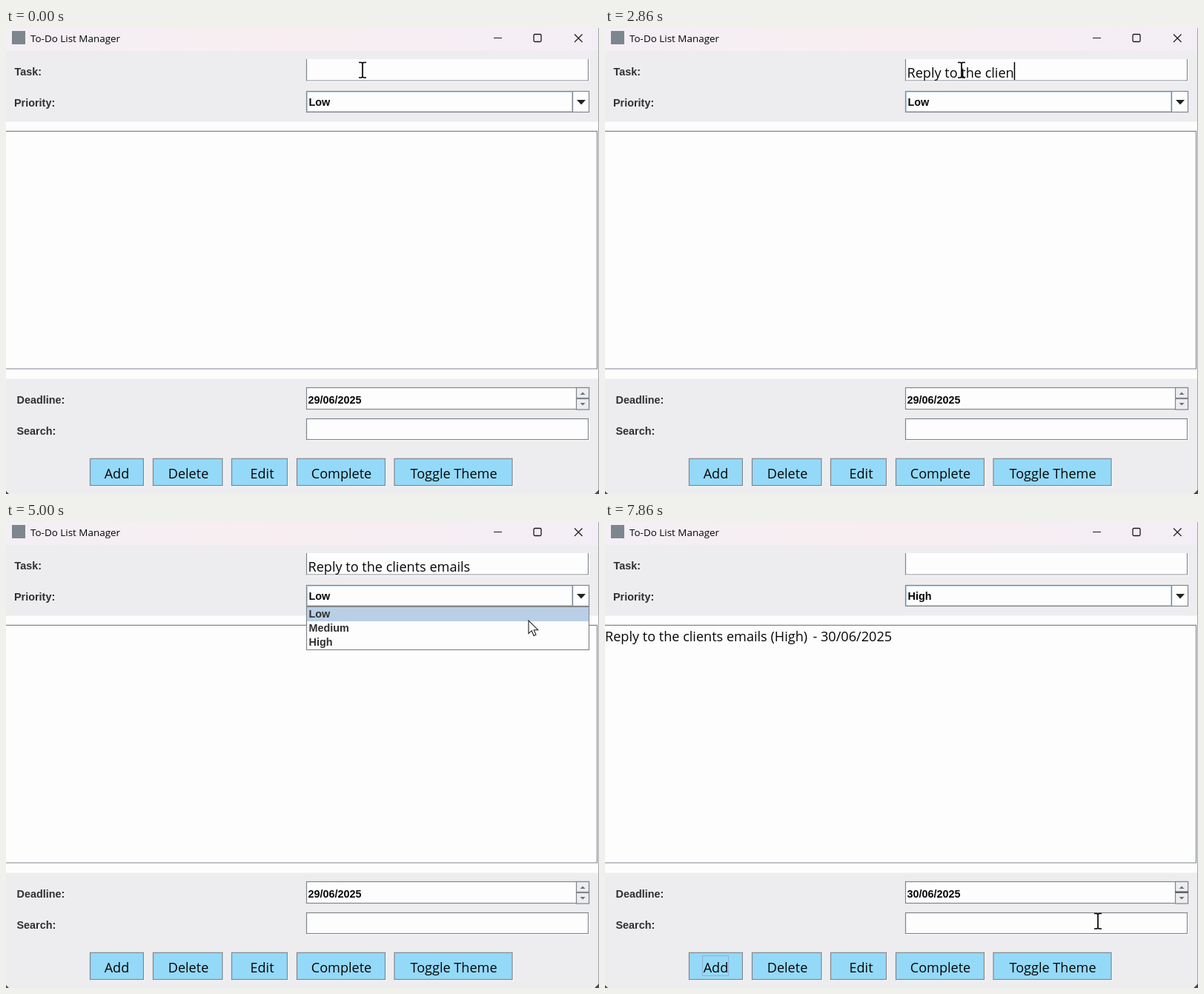
Animation of 800x629 px, one loop 8 s. Source, as an HTML page:

```html
<!DOCTYPE html>
<html lang="en">
<head>
<meta charset="utf-8">
<title>To-Do List Manager</title>
<style>
html, body { margin: 0; width: 100%; height: 100%; overflow: hidden; background: #fdfdfd; }
svg { display: block; width: 100vw; height: 100vh; }
text { white-space: pre; }
.ui { font: 18.1px "Open Sans", "Noto Sans", sans-serif; fill: #060606; }
.bold { font: bold 14.4px "Liberation Sans", Arial, sans-serif; fill: #303030; }
.dark { fill: #080808; }
.edge { fill: none; stroke: #80868d; stroke-width: 1.2; }
.lite { fill: none; stroke: #fff; }
.mid { text-anchor: middle; }
</style>
</head>
<body>
<svg id="stage" viewBox="0 0 800 629">
  <defs>
    <linearGradient id="bar">
      <stop offset="0" stop-color="#f3eff4"/>
      <stop offset=".45" stop-color="#f8eef1"/>
      <stop offset="1" stop-color="#f3eef5"/>
    </linearGradient>
  </defs>
  <rect width="800" height="629" fill="#fdfdfd"/>
  <rect width="800" height="31" fill="url(#bar)"/>
  <rect x="8" y="4" width="18" height="18" fill="#7d868f"/>
  <text x="33" y="19" class="ui" style="font-size:13.45px">To-Do List Manager</text>
  <path d="M658 13.5h11M767 8.500l10.500 10.500M777.500 8.500l-10.500 10.500" fill="none" stroke="#1a1a1a" stroke-width="1.200"/>
  <rect x="712" y="8.500" width="10" height="10" rx="1.500" fill="none" stroke="#1a1a1a" stroke-width="1.300"/>

  <rect y="31" width="799" height="95.500" fill="#ededef"/>
  <rect y="473.500" width="799" height="156" fill="#ededef"/>
  <path class="edge" d="M0 139.300H797.500V460H0"/>
  <path d="M799.500 0V629" stroke="#a2a2a6"/>
  <path d="M0 625v4h4zM800 623v6h-6z" fill="#4a4a4e"/>

  <text x="11.500" y="64" class="bold">Task:</text>
  <text x="11" y="106" class="bold">Priority:</text>
  <text x="14.500" y="507" class="bold">Deadline:</text>
  <text x="14.500" y="549" class="bold">Search:</text>

  <rect x="405" y="42" width="381" height="30" fill="#fdfdfd"/>
  <path class="edge" d="M405.500 42V71H785.500V42"/>
  <path class="lite" d="M406 72.300H786.700V42"/>
  <text id="task" x="407.500" y="66.500" class="ui"></text>
  <rect id="caret" y="46" width="1.500" height="24" fill="#000"/>

  <rect x="405.500" y="85.500" width="381" height="28" class="edge" style="fill:#fdfdfd"/>
  <rect id="combo" x="406.500" y="86.500" width="357" height="26" stroke="#b8cfe5"/>
  <path class="edge" d="M764.500 86V113"/>
  <path d="M770 97h12l-6 6.500z" fill="#222"/>
  <text id="level" x="408.500" y="105" class="bold"></text>

  <rect x="405.500" y="485.500" width="381" height="29" class="edge" style="fill:#fdfdfd"/>
  <rect id="mark" x="408" y="492" width="17" height="18" fill="#b4c6da"/>
  <text id="date" x="407.500" y="507" class="bold dark"></text>
  <rect x="769.500" y="485.500" width="17" height="14" class="edge" style="fill:#ededef"/>
  <rect x="769.500" y="500.500" width="17" height="14.500" class="edge" style="fill:#ededef"/>
  <path d="M774.500 495h7l-3.500-3.500zM774.500 506h7l-3.500 3.500z" fill="#6c737a"/>
  <path id="spun" d="M769 499.500h18" stroke="#505962" stroke-width="2"/>

  <rect x="405.500" y="527.500" width="380" height="28" class="edge" style="fill:#fdfdfd"/>
  <path class="lite" d="M406 556.700H786.700V528"/>

  <g id="buttons"></g>
  <rect id="focus" x="131.500" y="585.500" width="35" height="27" fill="none" stroke="#8fafd0"/>

  <text id="entry" class="ui" y="161"><tspan x="0">Reply to the clients emails</tspan><tspan x="223.500">(High)</tspan><tspan x="280.500">- 30/06/2025</tspan></text>

  <g id="popup">
    <rect x="405.500" y="114.500" width="381" height="58" class="edge" style="fill:#fdfdfd"/>
    <rect id="hover" x="406" width="380" height="19" fill="#b8cfe5"/>
    <text x="408.500" y="129" class="bold">Low</text>
    <text x="408.500" y="148" class="bold">Medium</text>
    <text x="408.500" y="167" class="bold">High</text>
  </g>

  <path id="beam" d="M-5-10.500H-1.500L0-9.500L1.500-10.500H5M0-9.500V9.500M-5 10H-1.500L0 9L1.500 10H5" fill="none" stroke="#000" stroke-width="1.700"/>
  <path id="arrow" d="M0 0V17.500L4.200 13.700L7 20.500L10 19.200L7.200 12.700H12.700Z" fill="#fff" stroke="#222" stroke-width="1.100"/>
</svg>
<script>
const LOOP = 8000, STEPS = 56;
const MESSAGE = 'Reply to the clients emails';
const $ = id => document.getElementById(id);
const show = (id, on) => $(id).setAttribute('visibility', on ? 'visible' : 'hidden');

// label, left, width, text centre
const BUTTONS = [
  ['Add', 113, 73, 149.5], ['Delete', 198, 94.5, 246], ['Edit', 304, 76, 345.5],
  ['Complete', 392, 120, 452.5], ['Toggle Theme', 523.5, 160, 604]
];
$('buttons').innerHTML = BUTTONS.map(([label, x, w, mid]) => `
  <path class="lite" d="M${x + 1} 618.7H${x + w + .7}V582"/>
  <rect id="${label}" x="${x + .5}" y="581.3" width="${w - 1}" height="36.2" class="edge"/>
  <text x="${mid}" y="608" class="ui mid">${label}</text>`).join('');
for (const [label] of BUTTONS) $(label).style.fill = '#94d9f8';

// step, x, y
const PATH = [
  [29, 481, 57], [32, 785, 87], [33, 776, 99], [34, 770, 103], [36, 640, 163], [37, 610, 164],
  [39, 491, 545], [41, 777, 493], [43, 777, 493], [46, 400, 548], [48, 158, 602],
  [51, 158, 602], [54, 640, 542], [55, 665, 539]
];

function pointer(k) {
  const i = PATH.findIndex(p => p[0] >= k);
  if (i === 0) return PATH[0].slice(1);
  const [k0, x0, y0] = PATH[i - 1], [k1, x1, y1] = PATH[i];
  const u = (k - k0) / (k1 - k0);
  return [x0 + (x1 - x0) * u, y0 + (y1 - y0) * u];
}

const within = (v, a, b) => v >= a && v <= b;

function overText(x, y) {
  return within(x, 405, 786) && (within(y, 42, 72) || within(y, 527, 556)) ||
    within(x, 405, 768) && within(y, 485, 515);
}

function draw(t) {
  const k = Math.min(STEPS - 1, Math.floor(t / LOOP * STEPS + .05));
  const time = k * LOOP / STEPS;
  const typed = Math.max(0, Math.floor((time - 400) / 129 - 1));
  const added = k >= 50, spun = k >= 42, chosen = k >= 37, open = k >= 33 && !chosen;
  const comboFocus = chosen && !spun;
  const [x, y] = pointer(k);

  $('task').textContent = added ? '' : MESSAGE.slice(0, typed);
  show('caret', typed > 0 && k < 33);
  $('caret').setAttribute('x', 407.5 + (typed ? $('task').getComputedTextLength() : 0));

  $('level').textContent = chosen ? 'High' : 'Low';
  $('level').style.fill = comboFocus ? '#333' : '#080808';
  $('combo').setAttribute('fill', comboFocus ? '#a3b8cc' : '#fdfdfd');
  show('popup', open);
  show('hover', open);
  const row = Math.max(0, Math.min(2, Math.floor((y - 115) / 19)));
  $('hover').setAttribute('y', 115 + row * 19);

  $('date').textContent = (spun ? '30' : '29') + '/06/2025';
  show('mark', spun && k < 49);
  show('spun', spun);

  $('Add').style.fill = k === 49 ? '#b8cfe5' : '#94d9f8';
  show('focus', k >= 49);
  show('entry', added);

  const beam = overText(x, y) && !open;
  show('beam', beam);
  show('arrow', !beam);
  for (const id of ['beam', 'arrow']) $(id).setAttribute('transform', `translate(${x} ${y})`);
}

const start = performance.now();
function tick() {
  draw((performance.now() - start) % LOOP);
  requestAnimationFrame(tick);
}
tick();
</script>
</body>
</html>
```
